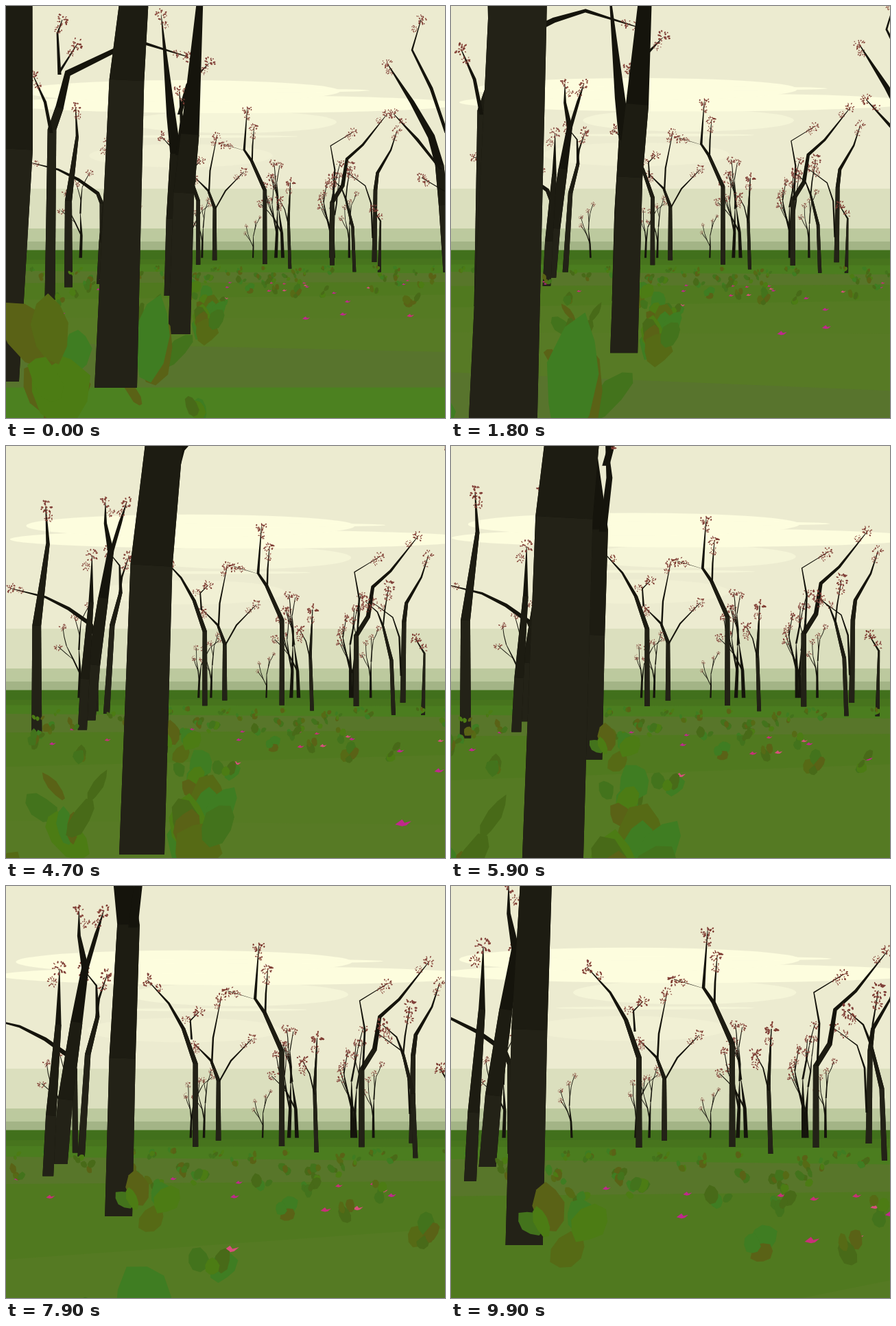
Recreate the animation shown at these times as an HTML page with a canvas. Size 640 px wide and 600 px high, loop 10000 ms.

```html
<!DOCTYPE html>
<html lang="en">
<head>
<meta charset="utf-8">
<title>Forest walk</title>
<style>
html, body { margin: 0; width: 100%; height: 100%; overflow: hidden; background: #ecebd0; }
canvas { display: block; }
</style>
</head>
<body>
<canvas id="stage" width="640" height="600"></canvas>
<script>
const ctx = document.getElementById('stage').getContext('2d');
const HORIZON = 349, EYE = 960, DROP = 17;
const BARK = ['#232217', '#1d1c12', '#15140c'];
const PETALS = ['#7b382e', '#8a483c', '#80403a'];
const FLOWERS = ['#c0288c', '#d8507c', '#c83078'];
const GREENS = ['#486a18', '#3f7d22', '#566a15', '#5a6216', '#43731c', '#4c7c14'];
// Meadow strips from near to far
const MEADOW = ['#4c8120', '#58742d', '#577a25', '#557a23', '#50791f', '#58762a', '#4b7d1f', '#47741d'];
const SKY = [[0, '#ecebd0'], [266, '#dbdfbe'], [324, '#bcc99e'], [343, '#a3b486'], [355.5, '#41701c']];
const CLOUDS = [
  [255, 218, 134, 17, '#f1f0d4'], [330, 169, 152, 16, '#f5f5d8'], [290, 190, 135, 2, '#f5f5d8'],
  [330, 143, 330, 13, '#fdfdde'], [255, 124, 232, 16, '#fdfdde'], [330, 123, 200, 3, '#fdfdde']
];
// Camera turn in pixels over time in seconds
const TURNS = [[0, 0], [1.8, 16], [3.2, 8], [4.7, 16], [7.1, 12], [8.8, 3], [9.9, 10]];
const items = [];

let seed = 7;
function rnd(a = 0, b = 1) {
  seed = (seed + 0x6D2B79F5) | 0;
  let r = Math.imul(seed ^ seed >>> 15, 1 | seed);
  r = r + Math.imul(r ^ r >>> 7, 61 | r) ^ r;
  return a + (b - a) * ((r ^ r >>> 14) >>> 0) / 4294967296;
}
const pick = list => list[Math.floor(rnd(0, list.length))];

function centre(t) {
  let i = 1;
  while (i < TURNS.length - 1 && t > TURNS[i][0]) i++;
  const [t0, a] = TURNS[i - 1], [t1, b] = TURNS[i];
  return 320 + a + (b - a) * (1 - Math.cos(Math.PI * (t - t0) / (t1 - t0))) / 2;
}
const groundY = (t, depth) => HORIZON + (EYE - DROP * t) / Math.max(.3, depth - t);

function poly(points) {
  const path = new Path2D();
  points.forEach(([x, y]) => path.lineTo(x, y));
  path.closePath();
  return path;
}

function blob(x, y, rx, ry, turn, n) {
  const c = Math.cos(turn), s = Math.sin(turn);
  return poly(Array.from({ length: n }, (_, i) => {
    const a = i / n * 2 * Math.PI, k = rnd(.85, 1.12);
    const u = Math.cos(a) * rx * k, v = Math.sin(a) * ry * k;
    return [x + u * c - v * s, y + u * s + v * c];
  }));
}

// Shapes are laid out as seen at time t; depth is the time at which the camera passes them
const add = (t, depth, shapes) => items.push({ t, depth, shapes });

// A tapering line through the points, dark towards the tip
function limb(pts, width, trunk) {
  const along = [0];
  for (let i = 1; i < pts.length; i++) {
    along.push(along[i - 1] + Math.hypot(pts[i][0] - pts[i - 1][0], pts[i][1] - pts[i - 1][1]));
  }
  const edges = pts.map(([x, y], i) => {
    const a = pts[Math.max(0, i - 1)], b = pts[Math.min(pts.length - 1, i + 1)];
    const len = Math.hypot(b[0] - a[0], b[1] - a[1]);
    const half = Math.max(.9, width * (1 - (along[i] / along.at(-1)) ** 2.5)) / 2;
    const nx = -(b[1] - a[1]) / len * half, ny = i ? (b[0] - a[0]) / len * half : 0;
    return [[x + nx, y + ny], [x - nx, y - ny]];
  });
  const outline = [...edges.map(e => e[0]), ...edges.map(e => e[1]).reverse()];
  const shapes = [[BARK[2], poly(outline)]];
  for (let i = 0; trunk && i < Math.min(2, edges.length - 1); i++) {
    shapes.push([BARK[i], poly([...edges[i], ...edges[i + 1].slice().reverse()])]);
  }
  return shapes;
}

function blossom(x, y, r) {
  return Array.from({ length: 20 }, () => {
    const a = rnd(0, 2 * Math.PI), d = r * Math.sqrt(rnd());
    return [pick(PETALS), blob(x + d * Math.cos(a), y + d * Math.sin(a),
      r * rnd(.12, .25), r * rnd(.08, .17), a, 5)];
  });
}
const blossomSize = (t, depth) => (45 + 5.5 * depth) / (depth - t);

// Trunk and branches are x, y key points; every limb flowers at its tip and just below
function tree(t, depth, girth, ...limbs) {
  const r = blossomSize(t, depth), wood = [], bloom = [];
  limbs.forEach((v, n) => {
    const pts = [];
    for (let i = 0; i < v.length; i += 2) pts.push([v[i], v[i + 1]]);
    wood.push(...limb(pts, n ? girth * .35 : girth, !n));
    const [[ax, ay], [bx, by]] = pts.slice(-2);
    const back = 1.8 * r / Math.hypot(bx - ax, by - ay);
    bloom.push(...blossom(bx, by, r));
    bloom.push(...blossom(bx + (ax - bx) * back + rnd(-r, r), by + (ay - by) * back, r * .7));
  });
  add(t, depth, [...wood, ...bloom]);
}

// A small tree that forks by itself
function sapling(t, depth, x, height) {
  const shapes = [];
  (function grow(x, y, angle, len, width, forks) {
    const bend = angle + rnd(-.12, .12);
    const mx = x + Math.sin(angle) * len / 2, my = y - Math.cos(angle) * len / 2;
    const ex = mx + Math.sin(bend) * len / 2, ey = my - Math.cos(bend) * len / 2;
    shapes.push(...limb([[x, y], [mx, my], [ex, ey]], width, false));
    if (!forks) return shapes.push(...blossom(ex, ey, height / 22));
    grow(mx, my, bend - rnd(.15, .45), len * .65, width * .5, forks - 1);
    grow(ex, ey, bend + rnd(0, .35), len * .6, width * .5, forks - 1);
  })(x, groundY(t, depth) + 2, rnd(-.05, .05), height * .55, height / 26, 2);
  add(t, depth, shapes);
}

// Leaves fanned out above a point on the ground
function bush(t, depth, x, y, size, count, slim = .5) {
  add(t, depth, Array.from({ length: count }, () => {
    const a = rnd(-.7, .7) - Math.PI / 2, d = size * rnd(.15, .95), r = size * rnd(.2, .42);
    return [pick(GREENS), blob(x + d * Math.cos(a), y + d * Math.sin(a),
      r, r * rnd(slim, slim + .4), a + rnd(-.4, .4), 9)];
  }));
}

function flower(depth, x) {
  const y = groundY(0, depth), r = 55 / depth;
  const form = [[-1, .2], [-.2, -.4], [.1, 0], [.9, -.2], [.3, .3], [-.2, .4]];
  add(0, depth, [[pick(FLOWERS), poly(form.map(([u, v]) => [x + u * r, y + v * r]))]]);
}

// Foreground trunks
tree(0, 4.9, 66, [-14, 547, 8, 208, 12, 0, 18, -500]);
tree(0, 4.6, 62, [160, 556, 176, 108, 186, 0, 204, -330]);
tree(4.7, 9.2, 66, [198, 595, 212, 174, 230, 0, 275, -600]);
tree(7.1, 15.4, 36, [184, 470, 189, 262, 197, 86, 185, -15, 158, -290],
  [203, 90, 214, 0, 207, -85], [208, -20, 230, -100, 288, -159]);

// Left side
tree(0, 14, 15, [64, 428, 67, 180, 78, 148, 90, 98, 158, 65, 198, 53, 265, 74],
  [66, 185, 57, 140, 40, 102], [78, 100, 75, 40, 82, 20], [78, 96, 104, 55]);
tree(3.2, 22, 14, [60, 417, 60, 270, 75, 160, 72, 110]);
tree(9.9, 25, 18, [28, 430, 33, 330, 45, 180, 47, 88]);
tree(9.9, 28, 25, [53, 409, 62, 305, 80, 180, 94, 92, 84, 40, 84, 0], [94, 98, 112, 38, 124, 0]);
tree(9.9, 38, 9, [87, 390, 86, 260, 78, 240, 40, 213, 0, 193, -60, 178]);
tree(8.8, 29, 11, [95, 395, 105, 240, 120, 182, 118, 135, 98, 110], [118, 185, 122, 155, 134, 120]);

// Middle
tree(9.9, 34.4, 9, [274, 381, 274, 250, 255, 195, 232, 155, 198, 118], [268, 212, 266, 182, 280, 168]);
tree(9.9, 60, 8, [311, 371, 311, 280, 300, 250, 275, 225], [301, 255, 303, 215, 315, 155],
  [312, 282, 330, 250, 362, 217]);
tree(9.9, 35, 9, [410, 380, 410, 230, 383, 170, 368, 148, 374, 65], [368, 149, 325, 136],
  [384, 173, 385, 140, 388, 102]);
tree(9.9, 32, 7, [466, 390, 463, 290, 467, 208], [463, 298, 455, 265, 444, 245]);

// Right side
tree(9.9, 43, 9, [532, 381, 532, 262, 552, 230, 560, 180, 590, 153, 636, 95],
  [534, 262, 537, 200, 529, 155, 570, 130]);
tree(9.9, 44.5, 9, [609, 375, 611, 240, 615, 208, 640, 165, 652, 128],
  [606, 330, 603, 265, 592, 232, 558, 207]);
tree(9.9, 26.2, 8, [632, 400, 628, 295, 612, 230, 601, 202, 578, 182], [612, 230, 615, 200, 623, 152]);
tree(4.7, 26.8, 6, [608, 392, 610, 302, 597, 281]);
tree(0, 20, 15, [645, 388, 638, 290, 632, 232, 620, 190, 592, 140, 556, 84],
  [634, 238, 600, 195, 565, 157], [642, 185, 620, 120, 592, 64, 605, 20], [640, 270, 606, 250]);

// Far saplings: x and height
for (const [x, height] of [[77, 140], [176, 85], [269, 95], [289, 95], [378, 68], [418, 150],
  [430, 155], [514, 155], [519, 135], [546, 105]]) sapling(9.9, 60, x, height);

// Plants close to the path
bush(0, 4.4, 75, 600, 150, 8);
bush(0, 5.5, 200, 600, 150, 4, .15);
bush(0, 4, 285, 605, 50, 3);
bush(3.2, 7.2, 95, 610, 100, 4, .15);
bush(4.7, 9.1, 266, 605, 115, 9);
bush(4.7, 9.4, 100, 590, 110, 7, .25);
bush(7.1, 10.1, 225, 625, 100, 6);
bush(7.1, 12.2, 312, 545, 50, 4);
bush(9.9, 15.2, 158, 550, 90, 6);

// Scattered undergrowth, denser with distance
for (let n = 0; n < 85; n++) {
  const depth = Math.sqrt(rnd(110, 720));
  bush(0, depth, rnd(-140, 780), groundY(0, depth), 210 / depth, Math.floor(rnd(3, 6)));
}
for (let n = 0; n < 26; n++) flower(Math.sqrt(rnd(40, 400)), rnd(-50, 690));

items.sort((a, b) => b.depth - a.depth);

function place(item, t) {
  const z = item.depth - t, k = (item.depth - item.t) / z;
  ctx.setTransform(k, 0, 0, k, centre(t) - centre(item.t) * k,
    HORIZON * (1 - k) + DROP * (item.t - t) / z);
}

function drawSky(t) {
  for (const [y, color] of SKY) {
    ctx.fillStyle = color;
    ctx.fillRect(0, y, 640, 600 - y);
  }
  place({ t: 0, depth: 150 }, t);
  for (const [x, y, rx, ry, color] of CLOUDS) {
    ctx.fillStyle = color;
    ctx.beginPath();
    ctx.ellipse(x, y, rx, ry, 0, 0, 2 * Math.PI);
    ctx.fill();
  }
}

function drawMeadow(t) {
  for (let i = MEADOW.length - 1; i >= 0; i--) {
    const depth = 4.65 * 1.4 ** i, tilt = 1 + .05 * Math.sin(i * 1.5);
    ctx.fillStyle = MEADOW[i];
    ctx.fill(poly([[0, groundY(t, depth * tilt)], [640, groundY(t, depth / tilt)], [640, 4000], [0, 4000]]));
  }
}

function draw(t) {
  ctx.setTransform(1, 0, 0, 1, 0, 0);
  drawSky(t);
  ctx.setTransform(1, 0, 0, 1, 0, 0);
  drawMeadow(t);
  for (const item of items) {
    if (item.depth - t < .35) continue;
    place(item, t);
    for (const [color, path] of item.shapes) {
      ctx.fillStyle = color;
      ctx.fill(path);
    }
  }
}

function frame() {
  draw(Math.floor(performance.now() % 10000 / 100) / 10);
  requestAnimationFrame(frame);
}
frame();
</script>
</body>
</html>
```
